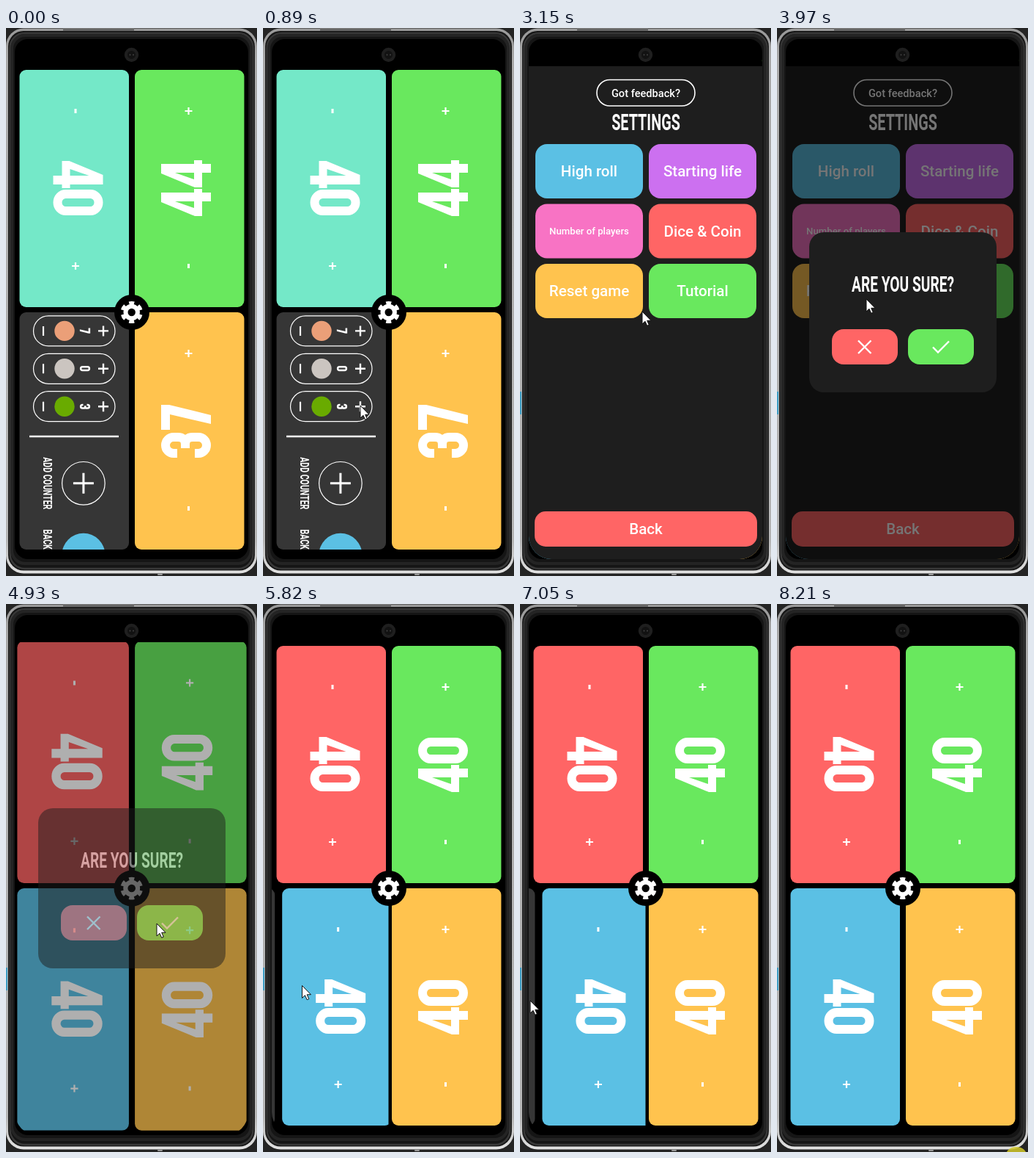
An HTML page that plays this animation: 343x746 px, repeating every 8.35 s.

```html
<!DOCTYPE html>
<html lang="en">
<head>
<meta charset="utf-8">
<title>Life counter</title>
<style>
  html, body { margin: 0; width: 100%; height: 100%; overflow: hidden; background: #222; }
  svg { display: block; width: 343px; height: 746px; }
  text { font-family: Roboto, sans-serif; font-weight: 500; fill: #fff; text-anchor: middle; }
  .caps { font-weight: 700; }
  .line { fill: none; stroke: #fff; }
</style>
</head>
<body>
<svg id="stage" viewBox="0 0 343 746"></svg>
<script>
const LOOP = 8350;
const PAGE = 159.5; // distance between the two swipe pages
const RED = '#ff6565', GREEN = '#69e85e', BLUE = '#5bc0e4', YELLOW = '#ffc34e', TEAL = '#74e8c8';

// Digits in a 35 x 68 box: stroked centre lines or filled outlines.
const STROKED = {
  0: 'M6 17A11.5 11 0 0 1 29 17V51A11.5 11 0 0 1 6 51Z',
  3: 'M7 22V17A11 11 0 0 1 29 17V23Q29 33 19 33H14M19 33Q29 33 29 43V51A11 11 0 0 1 7 51V46',
  6: 'M29 22V17A11.5 11 0 0 0 6 17V51A11.5 11 0 0 0 29 51V42Q29 31 18 31Q10 31 6 37'
};
const FILLED = {
  4: 'M19 0H32V45H37V56H32V68H20V56H0V46ZM20 45V19L11 45Z',
  7: 'M0 0H34V11L20 68H8L21 12H0Z'
};

const rect = (x, y, w, h, r, fill, more = '') =>
  `<rect x="${x}" y="${y}" width="${w}" height="${h}" rx="${r}" fill="${fill}" ${more}/>`;
const circle = (x, y, r, fill, more = '') =>
  `<circle cx="${x}" cy="${y}" r="${r}" fill="${fill}" ${more}/>`;
const line = (d, width) => `<path class="line" d="${d}" stroke-width="${width}"/>`;
const at = (x, y, body, more = '') => `<g transform="translate(${x} ${y}) ${more}">${body}</g>`;
const label = (x, y, size, text) =>
  `<text x="${x}" y="${y + size * .356}" font-size="${size}">${text}</text>`;
const caps = (x, y, size, text, turn = 0) =>
  at(x, y, `<text class="caps" y="${size * .356}" font-size="${size}">${text}</text>`,
    `rotate(${turn}) scale(.64 1)`);
const plus = (x, y, r, width) => line(`M${x - r} ${y}h${2 * r}M${x} ${y - r}v${2 * r}`, width);

function number(value, x, y, scale = 1) {
  const digits = [...String(value)];
  const glyphs = digits.map((d, i) => at(i * 39, 0, STROKED[d]
    ? line(STROKED[d], 12)
    : `<path d="${FILLED[d]}" fill="#fff" fill-rule="evenodd"/>`)).join('');
  return at(x, y, glyphs, `scale(${scale}) translate(${-19.5 * digits.length + 1.5} -34)`);
}

function card(x, y, color, life, turn) {
  return rect(x, y, 149.5, 323, 9, color) + at(x + 75, y + 161.5,
    number(life, 0, -5) + line('M-108.5 -1.5h6', 3) + plus(105.5, -1.5, 5, 2.2), `rotate(${turn})`);
}

function counter(y, color, value) {
  return rect(37.5, y - 20.5, 111.5, 41, 20.5, 'none', 'stroke="#fff" stroke-width="1.2"') +
    line(`M51 ${y - 6.5}v13`, 2.2) + circle(80, y, 13.7, color) +
    at(108, y, number(value, 0, 0, .21), 'rotate(90)') + plus(133, y, 7, 2.4);
}

function panel(counters) {
  const top = counters ? 619.8 : 435.8;
  const list = counters ? counter(412.4, '#eb9f78', 7) + counter(463.8, '#cbc5c0', 0) +
    counter(515.2, '#69ab00', 3) + line('M32 556H154', 2.4) : '';
  return rect(18.5, 387, 149.5, 323, 9, '#363636') + list +
    circle(105.9, top, 29.3, 'none', 'stroke="#fff" stroke-width="1.2"') +
    plus(105.9, top, 14, 3) + caps(57, top, 16.5, 'ADD COUNTER', 90) +
    circle(105.9, top + 97.5, 29.5, BLUE) + caps(57, top + 97.5, 16.5, 'BACKGROUND', 90);
}

const gear = circle(172, 387, 24, '#000') + at(171.7, 387,
  '<circle class="line" r="8.2" stroke-width="6"/>' +
  '<circle class="line" r="12.7" stroke-width="4.8" pathLength="12" stroke-dasharray="1.05 .95" stroke-dashoffset="-.475"/>');

function board(id, color, lives, counters) {
  return `<g id="${id}">` + card(18.5, 57, color, lives[0], 90) + card(176, 57, GREEN, lives[1], -90) +
    `<g clip-path="url(#half)"><g class="slide">` + panel(counters) +
    at(PAGE, 0, card(18.5, 387, BLUE, lives[2], 90)) + '</g></g>' +
    card(176, 387, YELLOW, lives[3], -90) + gear + '</g>';
}

const option = (x, y, color, text, size = 20.6) =>
  rect(x, y, 147, 74, 16, color) + label(x + 73.5, y + 37, size, text);

const settings = rect(12, 52, 319, 671, 0, '#1e1e1e') +
  rect(105, 70.5, 134, 35.5, 17.7, 'none', 'stroke="#fff" stroke-width="1.6"') +
  label(172, 88.5, 14.6, 'Got feedback?') + caps(172, 128, 31, 'SETTINGS') +
  option(21, 158, BLUE, 'High roll') + option(176, 158, '#cc70f0', 'Starting life') +
  option(21, 239.5, '#f873c4', 'Number of players', 13.2) + option(176, 239.5, RED, 'Dice &amp; Coin') +
  option(21, 321, YELLOW, 'Reset game') + option(176, 321, GREEN, 'Tutorial') +
  rect(20, 658, 304, 48, 15, RED) + label(172, 682, 20.6, 'Back');

const dialog = rect(44, 278, 256, 218, 20, '#1e1e1e') + caps(172, 348.5, 30, 'ARE YOU SURE?') +
  rect(75, 410, 90, 48, 16, RED) + line('M111 425.5l17.5 17.5m0 -17.5l-17.5 17.5', 2.4) +
  rect(179, 410, 90, 48, 16, GREEN) + line('M213 434.5l7 7l15 -15', 2.4);

const phone = rect(0, 0, 343, 746, 0, '#242424') + rect(0, .5, 343, 742, 24, 'url(#rim)') +
  rect(3, 4, 337, 734.5, 21, '#151515') +
  rect(5.5, 7, 332, 729, 20, 'none', 'stroke="#383838" stroke-width="2.5"') +
  rect(8, 10, 327, 719, 18, 'none', 'stroke="#242424" stroke-width="4"') +
  rect(78, 2, 97, 1.2, 0, '#333') + rect(207, 743, 7, 2, 1, '#999');

const stage = document.getElementById('stage');
stage.innerHTML = `<defs>
  <linearGradient id="rim" x2="0" y2="1">
    <stop stop-color="#999"/><stop offset=".06" stop-color="#a8a8a8"/>
    <stop offset=".94" stop-color="#b4b4b4"/><stop offset="1" stop-color="#e2e2e2"/>
  </linearGradient>
  <clipPath id="screen">${rect(12, 15, 319, 708, 31, '#000')}</clipPath>
  <clipPath id="half">${rect(12, 387, 159.5, 323, 0, '#000')}</clipPath></defs>` + phone +
  rect(12, 15, 319, 708, 18, '#000') + `<g clip-path="url(#screen)"><g id="game">` +
  board('before', TEAL, [40, 44, 36, 37], true) +
  board('after', RED, [40, 40, 40, 40], false) + '</g>' +
  `<g id="settings">${settings}</g>` + rect(12, 15, 319, 37, 0, '#000') +
  rect(12, 15, 319, 708, 0, '#000', 'id="barrier"') + `<g id="dialog">${dialog}</g></g>` +
  circle(171.5, 36.5, 9.7, '#1f1f1f') + circle(171.5, 36.5, 5.5, '#121212') +
  circle(169.5, 36.5, 1, '#444') + circle(174, 36.5, 1, '#444') +
  rect(0, 495, 2, 31, 0, '#3f9ec4', 'id="edge"') +
  '<ellipse id="glow" cx="327" cy="750" rx="14" ry="11" fill="#d2c92a" opacity=".85"/>' +
  `<path id="cursor" d="M0 0V17L4 13.3L6.7 19.3L9.3 18.2L6.7 12.3H12Z" fill="#fff" stroke="#111"/>`;

const part = id => document.getElementById(id);
const show = (id, visible) => part(id).style.display = visible ? '' : 'none';
const ramp = (t, from, to) => Math.min(1, Math.max(0, (t - from) / (to - from)));
const easeOut = p => 1 - (1 - p) ** 2;
const zoom = s => `translate(171.5 384) scale(${s}) translate(-171.5 -384)`;

// Linear interpolation through [time, ...values] points.
function track(points, t) {
  const next = points.findIndex(p => p[0] > t);
  if (next === 0) return points[0].slice(1);
  if (next < 0) return points[points.length - 1].slice(1);
  const a = points[next - 1], b = points[next], p = (t - a[0]) / (b[0] - a[0]);
  return a.slice(1).map((v, i) => v + (b[i + 1] - v) * p);
}

const CURSOR = [
  [130, 312, 734], [350, 225, 690], [570, 125, 610], [690, 113, 570], [890, 133, 514], [1090, 133, 514],
  [1420, 18, 512], [1600, 10, 515], [1920, 130, 470], [2130, 171, 408], [2330, 167, 386],
  [3400, 167, 386], [3560, 122, 369], [4180, 122, 369], [4660, 206, 435], [5030, 206, 435],
  [5630, 42, 520], [5760, 42, 520], [6300, 145, 515], [6440, 148, 515], [6580, 148, 515],
  [6900, 20, 520], [7050, 14, 540], [7400, 113, 707], [7670, 246, 740]
];
const SWIPE = [
  [1120, 0], [1420, -105], [1560, -145], [1720, -157], [1850, -PAGE],
  [5790, -PAGE], [6180, -60], [6280, -26], [6370, -8], [6440, -3.4], [6510, 0],
  [6610, 0], [6900, -110], [7030, -146], [7170, -157], [7300, -PAGE]
];

function draw(now) {
  const t = now % LOOP;
  const reset = t >= 4800;
  const opening = easeOut(ramp(t, 2670, 2970)), closing = easeOut(ramp(t, 4800, 5160));
  const asking = reset ? 1 - ramp(t, 4800, 5110) : easeOut(ramp(t, 3700, 3900));

  show('before', !reset);
  show('after', reset);
  const [slide] = track(SWIPE, t);
  stage.querySelectorAll('.slide').forEach(g => g.setAttribute('transform', `translate(${slide})`));
  part('game').setAttribute('transform', zoom(1 + .05 * (reset ? 1 - closing : opening)));

  part('settings').setAttribute('opacity', reset ? 1 - ramp(t, 4800, 4900) : ramp(t, 2670, 2800));
  part('settings').setAttribute('transform', zoom(reset ? 1 - .1 * closing : .85 + .15 * opening));
  part('barrier').setAttribute('opacity', .54 * asking);
  part('dialog').setAttribute('opacity', asking ** 1.3);

  const [x, y] = track(CURSOR, t);
  part('cursor').setAttribute('transform', `translate(${x} ${y})`);
  show('cursor', t >= 130 && t < 7670);
  show('edge', t >= 1450);
  show('glow', t >= 8210);
}

let start;
function tick(now) {
  start ??= now;
  draw(now - start);
  requestAnimationFrame(tick);
}
draw(0);
requestAnimationFrame(tick);
</script>
</body>
</html>
```
